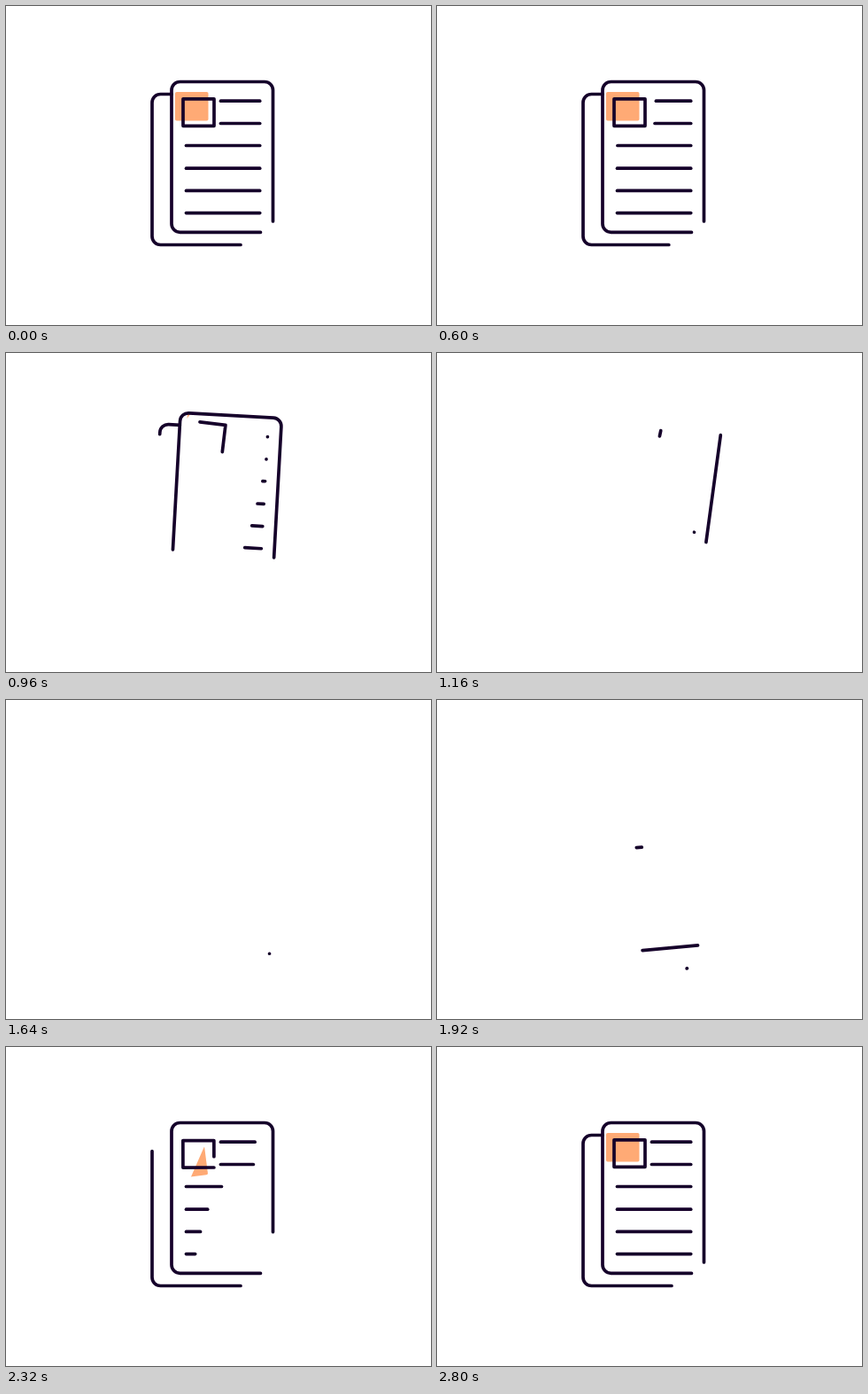
These frames come from a looping animation (480 px wide and 360 px high, 2840 ms). An HTML page:

```html
<!DOCTYPE html>
<html lang="en">
<head>
<meta charset="utf-8">
<title>Document loop</title>
<style>
  html, body { margin: 0; width: 100%; height: 100%; overflow: hidden; background: #fff; }
  svg { display: block; width: 100%; height: 100%; }
  .ink { fill: none; stroke: #15002a; stroke-width: 3.7; stroke-linecap: round; stroke-linejoin: round; }
</style>
</head>
<body>
<svg id="stage" viewBox="0 0 480 360">
  <clipPath id="wipe"><rect id="wipeArea" y="-60" height="120" transform="translate(191 97) rotate(31)"/></clipPath>
  <g id="patch"><rect x="191" y="97" width="37.5" height="32.5" rx="1.8" fill="#ffaa75" clip-path="url(#wipe)"/></g>
</svg>
<script>
const LOOP = 2840, TURN = 1560, WIPE = 49;
const stage = document.getElementById('stage');
const patch = document.getElementById('patch');
const wipeArea = document.getElementById('wipeArea');

// Cubic ease in and out over [from, to]; mid is the time of the halfway point.
function ease(t, from, to, mid = (from + to) / 2) {
  if (t <= from) return 0;
  if (t >= to) return 1;
  return t < mid
    ? 0.5 * ((t - from) / (mid - from)) ** 3
    : 1 - 0.5 * ((to - t) / (to - mid)) ** 3;
}

// Drift: [from, to, dx, dy, degrees]
const pageExit = [663, 1308, 12, -39, 8.1];
const boxExit = [580, 1319, 7.3, -43, 12.5];
const pageEnter = [1640, 2300, 0.4, 38, -7.7];

function part(d, hide, show, exit = pageExit, enter = pageEnter) {
  const el = document.createElementNS('http://www.w3.org/2000/svg', 'path');
  el.setAttribute('d', d);
  el.setAttribute('class', 'ink');
  stage.append(el);
  return { el, hide, show, exit, enter, len: el.getTotalLength() };
}

const parts = [
  part('M265 269.5H174.5A9.5 9.5 0 0 1 165 260V109A9.5 9.5 0 0 1 174.5 99.5H187',
    [511, 1151], [1877, 2527], pageExit, [1860, 2250, 6, 38, -7.7]),
  part('M287.5 255.3H196.5A9.5 9.5 0 0 1 187 245.8V95A9.5 9.5 0 0 1 196.5 85.5H292A9.5 9.5 0 0 1 301.5 95V243',
    [648, 1484], [1638, 2553]),
  part('M235 135.3H200V104.8H235V135.3',
    [556, 1342], [1800, 2661, 2068], boxExit, [1600, 2462, 0.4, 38, -6.5])
];

// Text lines: [left, y, delay]
[[242.5, 107.2, 0], [242.5, 132.5, 16], [203.5, 157.5, 100],
 [203.5, 183.2, 140], [203.5, 208.4, 168], [203.5, 233.6, 195]].forEach(([x, y, delay]) => {
  const from = 442 + delay;
  parts.push(part(`M${x} ${y}H286.7`, [from, from + 525], [from + 1520, from + 2045]));
});

const patchMove = { exit: boxExit, enter: [2090, 2500, 18, 38, -22] };

function place(el, { exit, enter }, t) {
  const leaving = t < TURN;
  const [from, to, dx, dy, turn] = leaving ? exit : enter;
  const p = ease(t, from, to);
  const k = leaving ? p : 1 - p;
  el.setAttribute('transform', `translate(${dx * k} ${dy * k}) rotate(${turn * k} 240 180)`);
}

function trim({ el, hide, show, len }, t) {
  const leaving = t < TURN;
  const a = leaving ? ease(t, ...hide) : 0;
  const b = leaving ? 1 : ease(t, ...show);
  const visible = b > a;
  el.style.display = visible ? '' : 'none';
  if (!visible) return;
  const whole = a === 0 && b === 1;
  el.style.strokeDasharray = whole ? 'none' : `${Math.max((b - a) * len, 0.02)} ${len * 2}`;
  el.style.strokeDashoffset = -a * len;
}

function draw(t) {
  for (const p of parts) {
    place(p.el, p, t);
    trim(p, t);
  }
  place(patch, patchMove, t);
  const leaving = t < TURN;
  const left = leaving ? 0 : WIPE * (1 - ease(t, 2140, 2560));
  const right = leaving ? WIPE * (1 - ease(t, 500, 1083)) : WIPE;
  // Spare margin keeps the rounded corners whole at rest.
  wipeArea.setAttribute('x', left - 1);
  wipeArea.setAttribute('width', right - left + 2);
  patch.style.display = right - left > 0.01 ? '' : 'none';
}

const start = performance.now();
function tick() {
  draw((performance.now() - start) % LOOP);
  requestAnimationFrame(tick);
}
tick();
</script>
</body>
</html>
```
